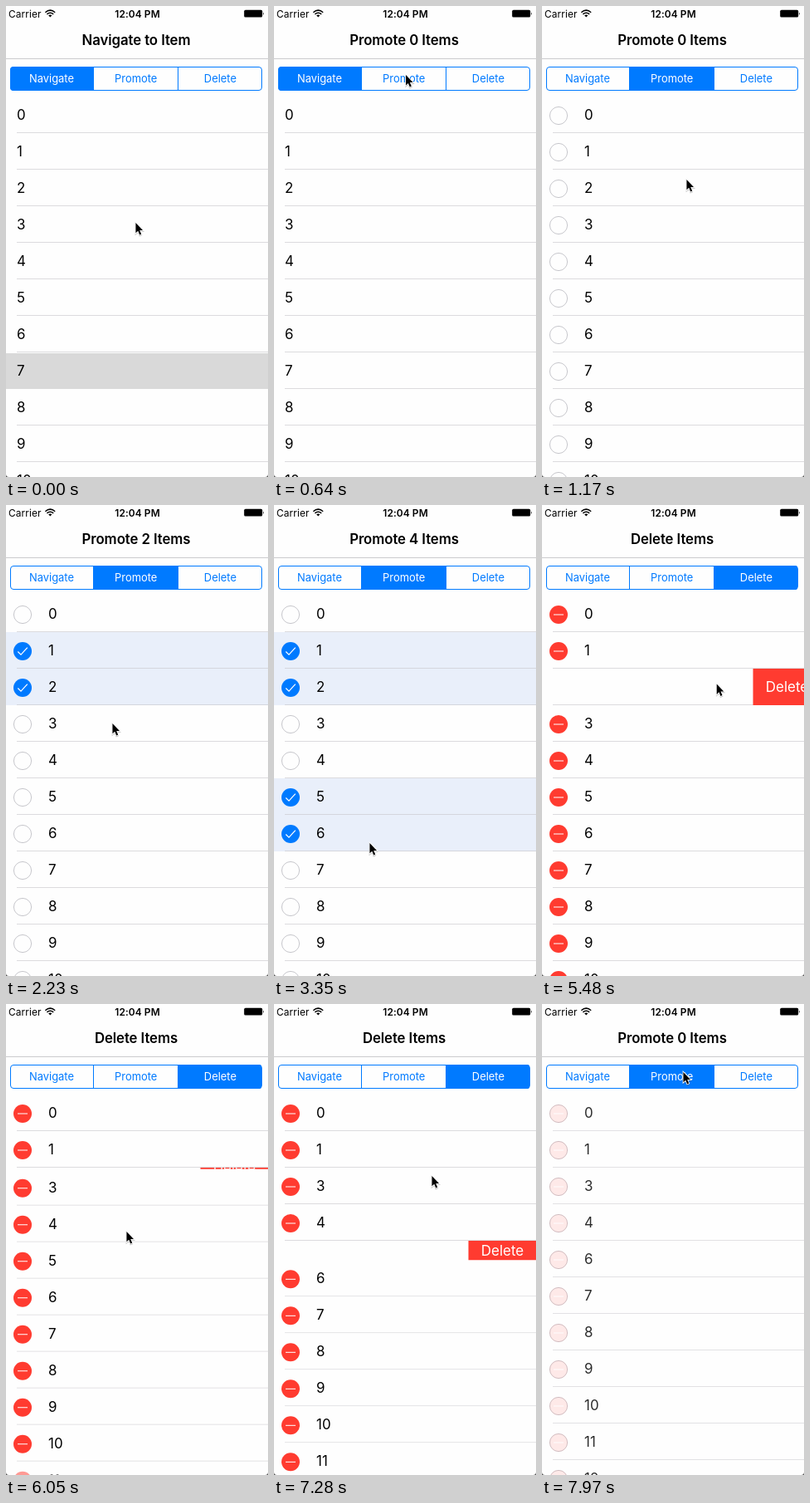
Animation, 316 px wide and 567 px high, one loop 8 s. Source, as an HTML page:

```html
<!DOCTYPE html>
<html lang="en">
<head>
<meta charset="utf-8">
<title>List editing modes</title>
<style>
  html, body { margin: 0; width: 100%; height: 100%; overflow: hidden; background: #fefefe; }
  #stage { display: block; width: 316px; height: 567px; font-family: Inter, Roboto, sans-serif; }
  .status { font-size: 11.9px; letter-spacing: .1px; }
  .title { font-size: 16.8px; font-weight: 600; letter-spacing: -.08px; text-anchor: middle; }
  .seg { font-size: 12.9px; text-anchor: middle; }
  .cell { font-size: 16.9px; }
  .del { font-size: 17px; fill: #fff; text-anchor: middle; }
</style>
</head>
<body>
<svg id="stage" width="316" height="567" viewBox="0 0 316 567">
  <clipPath id="pill"><rect x="5" y="73" width="304" height="29" rx="4"/></clipPath>
  <rect width="316" height="567" fill="#fefefe"/>
  <g id="rows"></g>

  <text class="status" x="3" y="13.5">Carrier</text>
  <path d="M47.4 7.7Q53.3 2.6 59.2 7.7M49.4 9.9Q53.3 6.5 57.2 9.9" fill="none" stroke="#000" stroke-width="1.5"/>
  <path d="M51.2 11.2Q53.3 9.6 55.4 11.2L53.3 13.4Z"/>
  <text class="status" x="158.5" y="13.5" text-anchor="middle" font-weight="600">12:04 PM</text>
  <rect x="287.2" y="4.8" width="22" height="8.8" rx="1.6"/>
  <path d="M310.2 7.4q1.6 1.8 0 3.6z"/>

  <text id="title" class="title" x="157" y="47"></text>
  <rect y="63" width="316" height="1" fill="#cbcbcd"/>

  <g id="fills" clip-path="url(#pill)" fill="#007aff"></g>
  <path d="M105.5 73V102M207.5 73V102" stroke="#007aff"/>
  <rect x="5.5" y="73.5" width="303" height="28" rx="3.5" fill="none" stroke="#007aff"/>
  <g id="labels"></g>

  <path d="M0 563.5Q0 567 3.5 567H0ZM316 563.5Q316 567 312.5 567H316Z" fill="#444"/>
  <g id="cursor" style="filter: drop-shadow(0 1px .7px rgba(0,0,0,.25))">
    <path transform="scale(.9)" d="M.5 0V13.7L3.6 10.9 5.8 16 8 15 5.8 10H10Z" stroke="#fff" stroke-width="1.8" paint-order="stroke"/>
  </g>
</svg>
<script>
const LOOP = 8000, ROW = 44, TOP = 109, BTN = 81.5, HOP = 600;
const PROMOTE = 640, DELETE = 4380, BACK = 7765;
const picks = { 1: 1470, 2: 1900, 5: 2940, 6: 3340 };
const opens = { 2: 5305, 5: 6665 };
const REMOVE = 460;                 // from opening a row to its removal
const refill = { 11: 2, 12: 5 };    // row that enters: row that leaves

// pointer stops: arrival time, x, y
const stops = [
  [0, 156, 261], [460, 158, 78], [1170, 174, 209], [1410, 150, 178],
  [1800, 136, 214], [2230, 128, 263], [2700, 115, 367], [3170, 115, 407],
  [4150, 257, 90], [5140, 14, 214], [5630, 266, 216], [6050, 145, 274],
  [6460, 12, 303], [6980, 266, 304], [7280, 190, 207], [7560, 170, 82]
];

const $ = id => document.getElementById(id);
const set = (el, k, v) => el.setAttribute(k, v);

function add(parent, tag, attrs = {}, text) {
  const el = document.createElementNS('http://www.w3.org/2000/svg', tag);
  for (const k in attrs) set(el, k, attrs[k]);
  if (text !== undefined) el.textContent = text;
  parent.append(el);
  return el;
}

// smooth 0..1 step that begins at a time
const ease = (t, from, len) => {
  const x = Math.min(1, Math.max(0, (t - from) / len));
  return x * x * (3 - 2 * x);
};

// each hop ends on its arrival time and lasts at most HOP
function pointer(t) {
  let [, x, y] = stops[0];
  for (let i = 1; i < stops.length; i++) {
    const [at, nx, ny] = stops[i];
    const len = Math.min(HOP, at - stops[i - 1][0]);
    const k = ease(t, at - len, len);
    x += (nx - x) * k;
    y += (ny - y) * k;
  }
  return [x, y];
}

const segs = ['Navigate', 'Promote', 'Delete'].map((name, i) => ({
  fill: add($('fills'), 'rect', { x: 5 + 101 * i, y: 73, width: 101, height: 29 }),
  label: add($('labels'), 'text', { class: 'seg', x: 55 + 101.7 * i, y: 92 }, name)
}));

const rows = Array.from({ length: 13 }, (_, n) => {
  const box = add($('rows'), 'svg', { width: 316, height: ROW });
  const tint = add(box, 'rect', { width: 316, height: ROW });
  const line = add(box, 'rect', { x: 13, y: 43, width: 303, height: 1, fill: '#c8c7cc', 'fill-opacity': .62 });
  const body = add(box, 'g');
  const disc = (parent, fill) => add(parent, 'circle', { cx: 20, cy: 23, r: 11, fill });
  const ring = add(body, 'circle', { cx: 20, cy: 23, r: 10.6, fill: 'none', stroke: '#c7c7cc' });
  const check = add(body, 'g');
  disc(check, '#007aff');
  add(check, 'path', { d: 'M14.3 23.5L18 27.2 25.8 18.6', fill: 'none', stroke: '#fff', 'stroke-width': 1.2 });
  const minus = add(body, 'g');
  disc(minus, '#ff3b30');
  add(minus, 'rect', { x: 14, y: 22.5, width: 12, height: 1, fill: '#fff' });
  const text = add(body, 'text', { class: 'cell', x: 51.1, y: 28 }, n);
  const btn = add(box, 'g');
  add(btn, 'rect', { width: BTN + 1, height: ROW, fill: '#ff3b30' });
  const word = add(btn, 'text', { class: 'del', x: 41 }, 'Delete');
  return { box, tint, line, body, ring, check, minus, text, btn, word };
});

function draw(t) {
  const edit = ease(t, PROMOTE + 20, 310);
  const red = ease(t, DELETE + 5, 250) - ease(t, BACK + 5, 250);
  const solid = 1 - .57 * Math.sqrt(red * (1 - red));
  const picking = t < DELETE;
  const count = picking ? Object.values(picks).filter(p => t >= p).length : 0;

  $('title').textContent = t < PROMOTE ? 'Navigate to Item'
    : t >= DELETE && t < BACK ? 'Delete Items' : `Promote ${count} Items`;

  const one = ease(t, PROMOTE, 160);
  const two = ease(t, DELETE - 10, 160) - ease(t, BACK - 10, 160);
  [1 - one, one - two, two].forEach((w, i) => {
    set(segs[i].fill, 'opacity', w);
    set(segs[i].label, 'fill', `rgb(${255 * w},${122 + 133 * w},255)`);
  });

  let y = TOP;
  rows.forEach((r, n) => {
    const picked = picking && t >= picks[n];
    const open = n in opens ? ease(t, opens[n], 260) : 0;
    const gone = n in opens ? ease(t, opens[n] + REMOVE, 325) : 0;
    const shown = n in refill ? ease(t, opens[refill[n]] + REMOVE + 210, 150) : 1;
    const held = n === 7 ? 1 - ease(t, 30, 390) : 0;
    const h = ROW * (1 - gone);

    set(r.box, 'y', y);
    set(r.box, 'height', h);
    set(r.box, 'opacity', shown);
    set(r.tint, 'y', picked ? 0 : 1);
    set(r.tint, 'fill', picked ? '#e9effa' : '#d9d9d9');
    set(r.tint, 'opacity', picked ? 1 : held);
    set(r.line, 'opacity', gone ? 0 : solid * (1 - held));
    set(r.body, 'transform', `translate(${-38 * (1 - edit) - BTN * open} 0)`);
    set(r.ring, 'opacity', picked ? 0 : edit * (1 - red));
    set(r.check, 'opacity', picked ? 1 : 0);
    set(r.minus, 'opacity', red);
    set(r.text, 'opacity', solid);
    set(r.btn, 'transform', `translate(${316 - BTN * open} 0)`);
    set(r.btn, 'opacity', open ? 1 : 0);
    set(r.word, 'y', h / 2 + 6);
    y += h;
  });

  set($('cursor'), 'transform', `translate(${pointer(t).join(' ')})`);
}

const start = performance.now();
function tick() {
  draw((performance.now() - start) % LOOP);
  requestAnimationFrame(tick);
}
tick();
</script>
</body>
</html>
```
